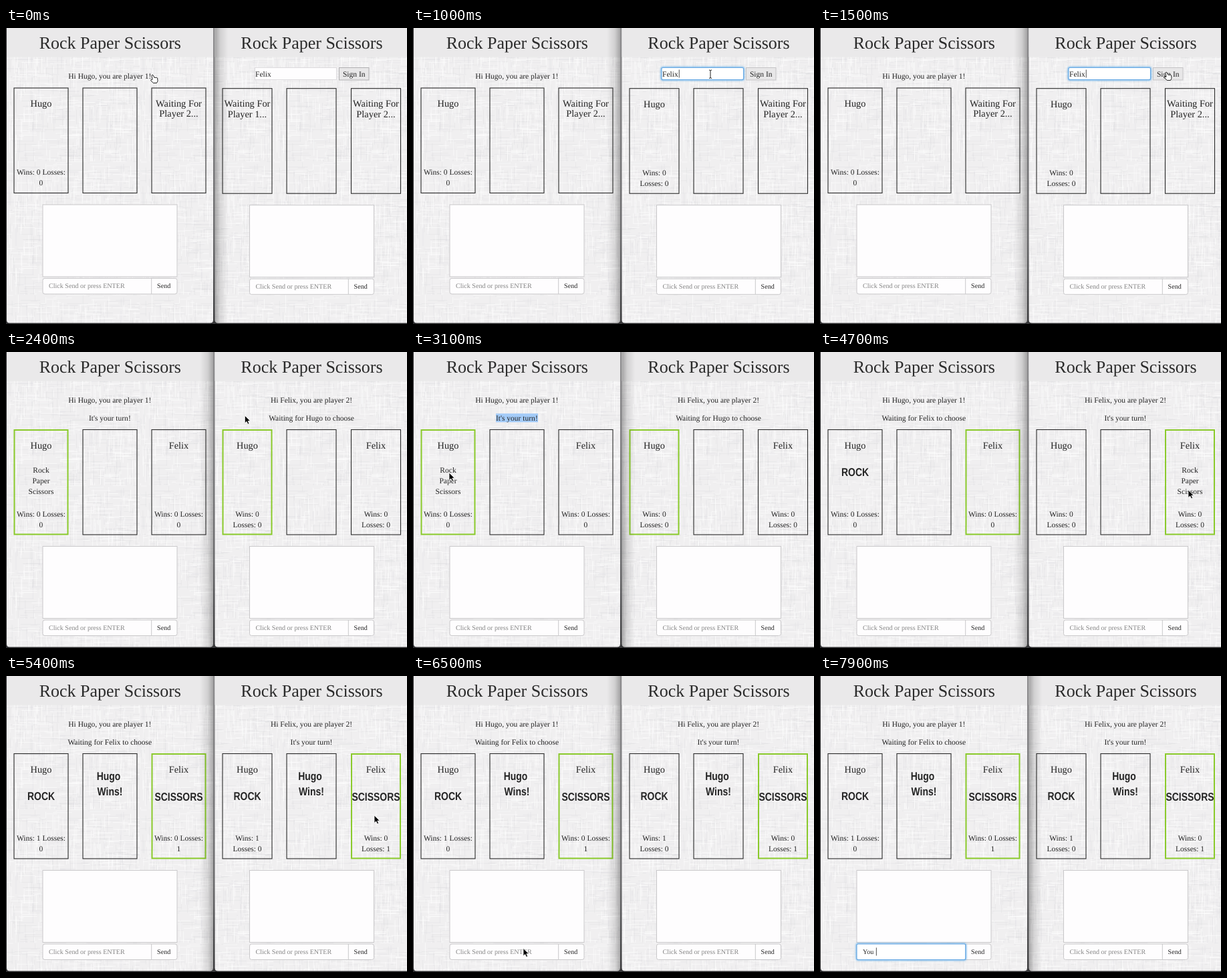
Write an HTML page that moves like this. It is 600 px wide and 444 px high and loops after 8 s.

```html
<!DOCTYPE html>
<html lang="en">
<head>
<meta charset="utf-8">
<title>Rock Paper Scissors</title>
<style>
  html, body { margin: 0; width: 100%; height: 100%; overflow: hidden; background: #3a3a3c; }
  svg { display: block; width: 600px; height: 444px; }
  text { font-family: "Liberation Serif", "Times New Roman", serif; font-size: 11.52px; fill: #242424; text-rendering: geometricPrecision; }
  .title { font-size: 26px; fill: #2b2b2b; }
  .name { font-size: 14.4px; }
  .small { font-size: 10.08px; }
  .hint { font-size: 10.08px; fill: #858585; }
  .pick { font: bold 17px "Liberation Sans", Arial, sans-serif; }
  .mid { text-anchor: middle; }
</style>
</head>
<body>
<svg viewBox="0 0 600 444">
  <defs>
    <pattern id="linen" width="200" height="200" patternUnits="userSpaceOnUse">
      <rect width="200" height="200" fill="#f0eff0"/>
      <path id="dark" stroke="#d9d7da" stroke-opacity=".42" stroke-width=".8"/>
      <path id="light" stroke="#fff" stroke-opacity=".6" stroke-width=".9"/>
    </pattern>
    <linearGradient id="gap" x2="0" y2="1">
      <stop stop-color="#8d8c8e"/><stop offset=".7" stop-color="#6a6a6c"/><stop offset="1" stop-color="#38383a"/>
    </linearGradient>
    <linearGradient id="shade">
      <stop stop-color="#000" stop-opacity=".3"/>
      <stop offset=".4" stop-color="#000" stop-opacity=".11"/>
      <stop offset="1" stop-color="#000" stop-opacity="0"/>
    </linearGradient>
    <filter id="glow" x="-10%" y="-40%" width="120%" height="180%"><feGaussianBlur stdDeviation="1.3"/></filter>
  </defs>
  <rect width="600" height="444" fill="#2c2c2e"/>
  <rect x="309" width="4" height="444" fill="url(#gap)"/>
  <path d="M1 0H310V438Q310 442.5 305.5 442.5H5.5Q1 442.5 1 438Z" fill="url(#linen)"/>
  <path d="M312.5 0H600V442.5H317Q312.5 442.5 312.5 438Z" fill="url(#linen)"/>
  <path d="M1 0H310V43.5H1ZM312.5 0H600V43.5H312.5Z" fill="#eae9ea"/>
  <g id="scene"></g>
</svg>
<script>
const LOOP = 8000, STEP = 100;
const ONE = 'Hugo', TWO = 'Felix';

// Moments at which something happens, in ms
const AT = {
  oneSeen: 100, nameFocus: 1000, signedIn: 1700, leftClick: 2700, marked: 2800,
  rock: 3400, rightClick: 4400, scissors: 5100, chatClick: 6700, typing: 7600
};

// Pointer path: time, x, y of its tip, shape from then on
const POINTER = [
  [0, 219, 70, 'hand'], [300, 219, 70, 'hand'], [400, 250, 73, 'arrow'], [500, 400, 78, 'arrow'],
  [600, 487, 83, 'arrow'], [700, 487, 83, 'arrow'], [900, 445, 63, 'beam'], [1000, 445, 63, 'beam'],
  [1200, 518, 66, 'hand'], [1700, 518, 66, 'arrow'], [2200, 460, 95, 'arrow'], [2300, 460, 95, 'arrow'],
  [2600, 152, 96, 'arrow'], [2800, 152, 96, 'arrow'], [3100, 54, 181, 'arrow'], [3200, 52, 175, 'arrow'],
  [3400, 52, 175, 'arrow'], [4000, 496, 260, 'arrow'], [4100, 505, 250, 'arrow'], [4700, 551, 207, 'arrow'],
  [5400, 551, 209, 'arrow'], [5500, 540, 218, 'arrow'], [5900, 250, 398, 'arrow'], [6300, 165, 410, 'arrow'],
  [6700, 165, 407, 'beam'], [7600, 165, 407, 'none']
];

const SHAPES = {
  arrow: '<path d="M0 0V11.5L2.7 9L4.6 13L6.6 12.1L4.8 8.2H8.3Z" fill="#000" stroke="#fff" stroke-width=".8"/>',
  hand: '<path d="M-1 1.2Q0-.6 1.3 1L3 4.6Q4-.1.4 5 4.6L6.2 4.2L7.6 5L8 9.5L6.5 12.5H1.2L-2.4 8.5Q-2.6 7 0 7.3Z" fill="#fff" stroke="#222" stroke-width="1"/>'.replace('Q4-.1.4', 'Q4 3.4'),
  beam: '<path d="M-2 0Q0 0 0 1.5Q0 0 2 0M0 1.5V11M-2 12.5Q0 12.5 0 11Q0 12.5 2 12.5" fill="none" stroke="#222"/>',
  none: ''
};

const text = (x, y, s, cls = 'mid') => `<text x="${x}" y="${y}" class="${cls}">${s}</text>`;
const lines = (x, y, gap, list, cls) => list.map((s, i) => text(x, y + i * gap, s, cls)).join('');
const rect = (x, y, w, h, attrs) => `<rect x="${x}" y="${y}" width="${w}" height="${h}" ${attrs}/>`;
const caret = (x, y) => rect(x, y, .8, 12, 'fill="#222"');

// One condensed face for picks and the verdict
const pick = (x, y, s) => `<g transform="translate(${x} ${y}) scale(.82 1)">${text(0, 0, s, 'pick mid')}</g>`;

const ring = (x, y, w, h) =>
  rect(x, y, w, h, 'rx="2" fill="none" stroke="#66afe9" stroke-width="3.4" stroke-opacity=".75" filter="url(#glow)"') +
  rect(x, y, w, h, 'rx="2" fill="#fff" stroke="#66a8e4" stroke-width="1.1"');

const LEFT = { mid: 155.3, cards: [12, 115, 218], w: 81, chat: 55, chatW: 201, split: 217.7, dy: 0 };
const RIGHT = { mid: 457, cards: [324, 420, 516.5], w: 74, chat: 364.5, chatW: 186, split: 512.3, dy: .7 };

function score(side, x, y, wins, losses) {
  const rows = side === LEFT
    ? [`Wins: ${wins} Losses:`, losses]
    : [`Wins: ${wins}`, `Losses: ${losses}`];
  return lines(x, y, 16, rows);
}

function card(side, i, top, active) {
  const style = active ? 'stroke="#8aca2b" stroke-width="2"' : 'stroke="#2a2a2a" stroke-width="1.1"';
  const inset = active ? .5 : 0;
  return rect(side.cards[i] + inset, top + inset, side.w - 2 * inset, 157.5 - 2 * inset, 'fill="none" ' + style);
}

function cards(side, t) {
  const playing = t >= AT.signedIn, done = t >= AT.scissors;
  const top = playing ? 116.5 : 90 + side.dy;
  const turn = !playing ? -1 : t < AT.rock ? 0 : 2;
  const center = side.cards.map(x => x + side.w / 2);
  let out = '';
  for (let i = 0; i < 3; i++) out += card(side, i, top, i === turn);

  const player = (i, name, known, wins, losses) => {
    const x = center[i], dy = i === turn ? .6 : 0;
    out += known
      ? text(x, top + 28 + dy, name, 'name mid') + score(side, x, top + 130, wins, losses)
      : lines(x, top + 27.7, 15.7, ['Waiting For', `Player ${i ? 2 : 1}...`], 'name mid');
  };
  player(0, ONE, side === LEFT || t >= AT.oneSeen, done ? 1 : 0, 0);
  player(2, TWO, playing, 0, done ? 1 : 0);

  const chooser = side === LEFT ? 0 : 2;
  if (turn === chooser && !done) out += lines(center[chooser], 181, 16, ['Rock', 'Paper', 'Scissors']);
  if (t >= (side === LEFT ? AT.rock : AT.scissors)) out += pick(center[0], 186.3, 'ROCK');
  if (done) {
    out += pick(center[2], 187, 'SCISSORS');
    out += pick(center[1] - 2, 156, ONE) + pick(center[1], 179, 'Wins!');
  }
  return out;
}

function chat(side, t) {
  const y = t >= AT.signedIn ? 291.5 : 265 + side.dy;
  const { chat: x, chatW: w, split } = side;
  const line = 'fill="#fefdfe" stroke="#c9c8ca" stroke-width="1"';
  let out = rect(x, y, w, 108, line) + rect(x, y + 110.5, w, 23.5, 'rx="3" ' + line);
  out += `<path d="M${split} ${y + 110.5}v23.5" stroke="#c9c8ca"/>`;
  out += text((split + x + w) / 2 - .7, y + 125.3, 'Send', 'small mid');

  const focused = side === LEFT && t >= AT.chatClick;
  const typed = side === LEFT && t >= AT.typing ? Math.floor((t - AT.typing) / STEP) + 1 : 0;
  if (focused) out += ring(x, y + 110.5, split - x, 23.5);
  out += typed
    ? text(x + 9, y + 125.3, 'You '.slice(0, typed), 'small')
    : text(x + 9, y + 125.3, 'Click Send or press ENTER', 'hint');
  if (focused) out += caret(x + 9 + 10.08 * [0, .722, 1.222, 1.722, 1.972][typed], y + 116);
  return out;
}

function signIn(t) {
  const focused = t >= AT.nameFocus;
  return (focused ? ring(372, 59.5, 122.5, 18) : rect(372.5, 59.5, 122, 18, 'fill="#fefdfe" stroke="#dcdadd"')) +
    text(373, 72.7, TWO, '') + (focused ? caret(397.8, 62.5) : '') +
    rect(498.5, 59.5, 44.5, 18.5, `fill="#e8e7e8" stroke="${focused ? '#c4c3c5' : '#b0afb1'}"`) +
    text(520.7, 72.7, 'Sign In');
}

function panel(side, t) {
  const isLeft = side === LEFT, playing = t >= AT.signedIn;
  let out = text(side.mid + .5, 31.3, 'Rock Paper Scissors', 'title mid');
  out += isLeft || playing
    ? text(side.mid, 75.8, `Hi ${isLeft ? ONE : TWO}, you are player ${isLeft ? 1 : 2}!`)
    : signIn(t);
  if (playing) {
    const mine = isLeft === t < AT.rock;
    if (isLeft && t >= AT.marked && t < AT.rock) out += rect(124, 92.3, 63, 13, 'fill="#a3cbf8"');
    out += text(side.mid, 102.5, mine ? "It's your turn!" : `Waiting for ${isLeft ? TWO : ONE} to choose`);
  }
  return out + cards(side, t) + chat(side, t);
}

// The active window drops its shadow on the other one
function shadow(t) {
  const rightActive = t >= AT.nameFocus && t < AT.leftClick || t >= AT.rightClick && t < AT.chatClick;
  return rect(0, 0, 20, 442, `fill="url(#shade)" transform="translate(${rightActive ? '310 0) scale(-1 1' : '312.5 0'})"`);
}

function pointer(t) {
  let i = POINTER.length - 1;
  while (POINTER[i][0] > t) i--;
  const [t0, x0, y0, kind] = POINTER[i];
  const [t1, x1, y1] = POINTER[i + 1] || [LOOP, x0, y0];
  const k = (t - t0) / (t1 - t0);
  return `<g transform="translate(${x0 + (x1 - x0) * k} ${y0 + (y1 - y0) * k})">${SHAPES[kind]}</g>`;
}

function weave() {
  let seed = 17;
  const rnd = () => (seed = seed * 16807 % 2147483647) / 2147483647;
  for (const id of ['dark', 'light']) {
    let d = '';
    for (let i = 0; i < 420; i++) {
      const x = (rnd() * 200).toFixed(1), y = (rnd() * 200).toFixed(1), len = (5 + rnd() * 28).toFixed(1);
      d += `M${x} ${y}${rnd() < .5 ? 'h' : 'v'}${len}`;
    }
    document.getElementById(id).setAttribute('d', d);
  }
}

const scene = document.getElementById('scene');
let shown = -1;

function draw(t) {
  if (t === shown) return;
  shown = t;
  scene.innerHTML = panel(LEFT, t) + panel(RIGHT, t) + shadow(t) + pointer(t);
}

const start = performance.now();
function tick() {
  const t = (performance.now() - start) % LOOP;
  draw(Math.floor(t / STEP) * STEP);
  requestAnimationFrame(tick);
}

weave();
tick();
</script>
</body>
</html>
```
